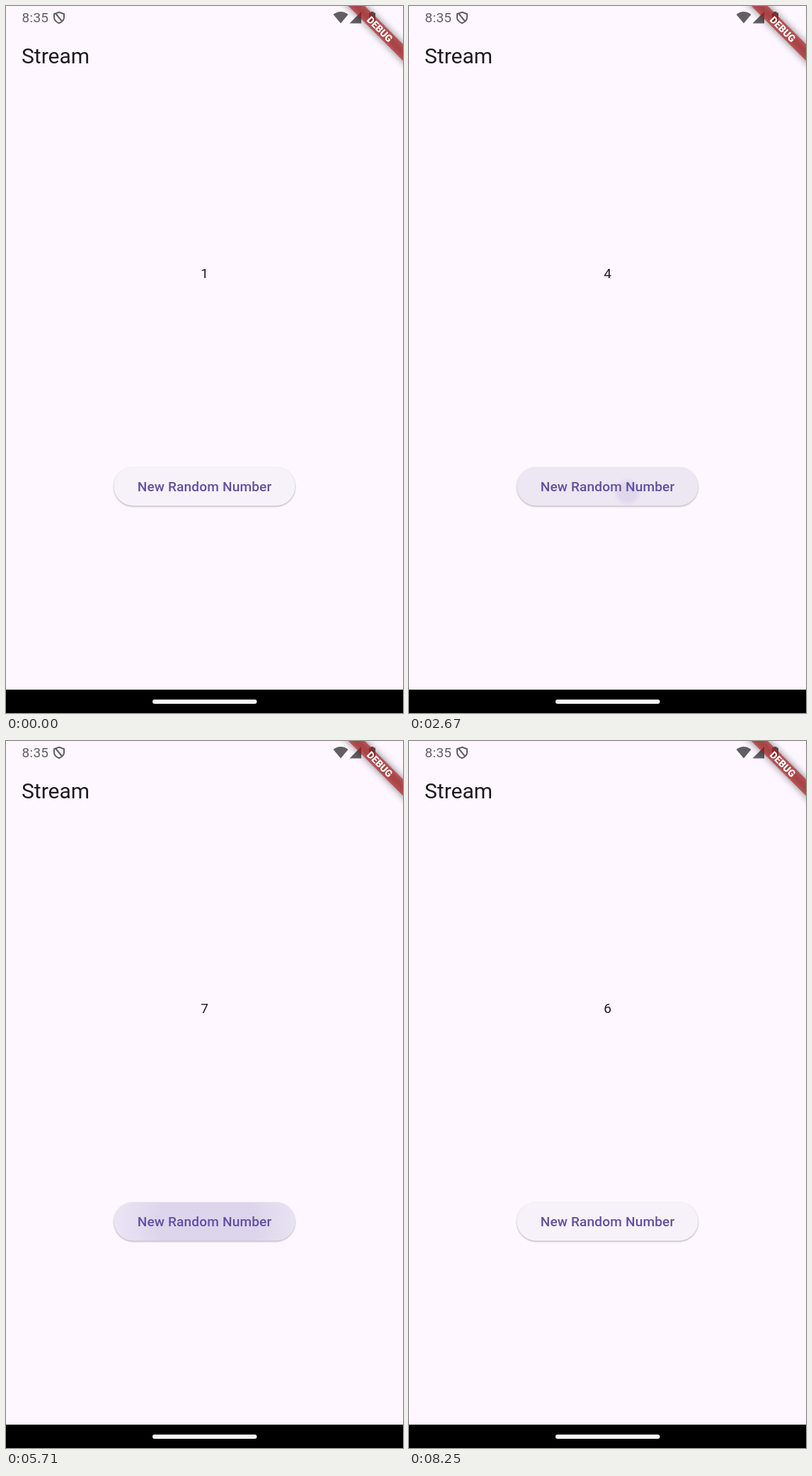
Write an HTML page that moves like this. It is 561 px wide and 998 px high and loops after 8.29 s.

```html
<!DOCTYPE html>
<html lang="en">
<head>
<meta charset="utf-8">
<title>Stream</title>
<style>
  html, body { margin: 0; width: 100%; height: 100%; overflow: hidden; background: #fef7ff; }
  svg { display: block; width: 561px; height: 998px; font-family: Roboto, sans-serif; }
  .mid { text-anchor: middle; }
  .status { fill: #625e63; }
  .line { fill: none; stroke: #625e63; stroke-width: 2; }
  .shadow { filter: drop-shadow(0 1.2px 1px rgba(0, 0, 0, .32)); }
  .glow { filter: blur(5.2px); }
</style>
</head>
<body>
<svg viewBox="0 0 561 998">
  <defs>
    <clipPath id="pill"><rect x="152.5" y="651" width="256" height="54.5" rx="27.25"/></clipPath>
    <radialGradient id="soft">
      <stop offset=".55" stop-color="#6750a4"/>
      <stop offset="1" stop-color="#6750a4" stop-opacity="0"/>
    </radialGradient>
  </defs>
  <rect width="561" height="998" fill="#fef7ff"/>

  <!-- status bar -->
  <g class="status">
    <text x="22.5" y="23" font-size="19" letter-spacing=".3">8:35</text>
    <path d="M473 24.5 462.5 12Q473 4 483.500 12Z"/>
    <path d="M502 8V24.500H485.500Z"/>
    <path d="M514 9.500h1.500V8h4v1.500h1.500q1 0 1 1v13q0 1-1 1h-7q-1 0-1-1v-13q0-1 1-1Z"/>
  </g>
  <path class="line" d="M75 8.800 82 11.200V16Q82 21.500 75 24.200Q68 21.500 68 16V11.200Z"/>
  <path class="line" d="M70 10.500 79.500 22"/>

  <text x="22" y="81" font-size="30" fill="#1d1b20">Stream</text>
  <text id="number" class="mid" x="280.5" y="384" font-size="19.1" fill="#1d1b20">1</text>

  <!-- button -->
  <rect class="shadow" x="152.5" y="651" width="256" height="54.5" rx="27.25" fill="#f7f2fa"/>
  <g clip-path="url(#pill)">
    <rect id="press" x="152" y="650" width="257" height="57" fill="#6750a4" opacity="0"/>
    <circle id="ripple" cy="686" fill="url(#soft)" opacity="0"/>
  </g>
  <text class="mid" x="280.5" y="685" font-size="19.1" font-weight="500" letter-spacing=".14" fill="#6250a0">New Random Number</text>

  <!-- corner banner -->
  <g transform="translate(561 0) rotate(45)">
    <rect class="glow" x="-70" y="38.2" width="140" height="16.4" opacity=".5"/>
    <rect x="-70" y="38.2" width="140" height="16.4" fill="#b71c1c" fill-opacity=".627"/>
    <text class="mid" y="51.2" font-size="13.9" font-weight="900" fill="#fff">DEBUG</text>
  </g>

  <!-- navigation bar -->
  <rect y="965" width="561" height="33"/>
  <rect x="207" y="979" width="147.500" height="6" rx="3" fill="#f7f7f7"/>
</svg>
<script>
  const LOOP = 8290, RIPPLE = 617, REACH = 205;
  const taps = [
    { at: 2590, x: 309, value: 4 },
    { at: 4000, x: 300, value: 7 },
    { at: 5450, x: 285, value: 6, hold: 310 },
    { at: 6650, x: 290, value: 6 }
  ];
  const byId = id => document.getElementById(id);
  const number = byId('number'), press = byId('press'), ripple = byId('ripple');
  const clamp = v => Math.min(1, Math.max(0, v));
  const smooth = v => v * v * (3 - 2 * v);

  function render(t) {
    let value = 1, tap = null;
    for (const p of taps) {
      if (t >= p.at) tap = p;
      if (t >= p.at + (p.hold || 0)) value = p.value;
    }
    if (number.textContent !== String(value)) number.textContent = value;

    const age = tap ? t - tap.at : 1e4;
    const life = age / RIPPLE;
    const shade = clamp(age / 100) * clamp(1 - (age - 310) / 200);
    const strength = clamp(life / .13) * clamp((1 - life) / .6);
    press.setAttribute('opacity', .09 * shade);
    ripple.setAttribute('opacity', .1 * strength);
    ripple.setAttribute('cx', tap ? tap.x : 280);
    ripple.setAttribute('r', 4 + REACH * smooth(clamp(life / .75)));
  }

  const start = performance.now();
  function tick() {
    render((performance.now() - start) % LOOP);
    requestAnimationFrame(tick);
  }
  tick();
</script>
</body>
</html>
```
